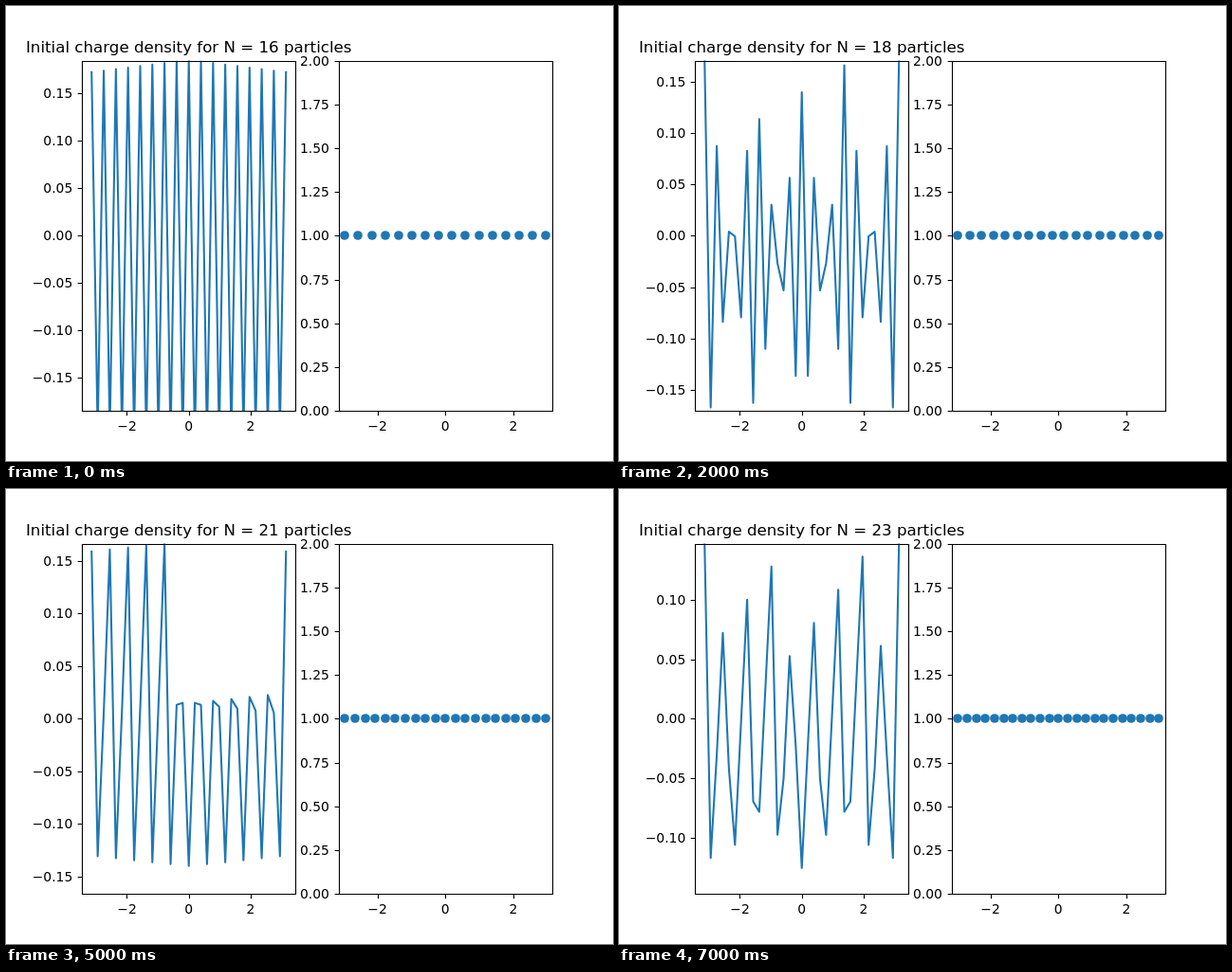
Recreate the animation shown at these times as an HTML page. Size 640x480 px, loop 8000 ms.

```html
<!DOCTYPE html>
<html>
<head>
<meta charset="utf-8">
<style>
  html, body { margin: 0; width: 100%; height: 100%; overflow: hidden; background: #fff; }
  svg { display: block; }
  text { font-family: "DejaVu Sans", sans-serif; font-size: 13.89px; }
  .title { font-size: 16.67px; }
  .axis { fill: none; stroke: #000; stroke-width: 1.11; }
  .curve { fill: none; stroke: #1f77b4; stroke-width: 2.083; stroke-linejoin: round; stroke-linecap: square; }
  circle { fill: #1f77b4; }
</style>
</head>
<body>
<svg id="stage" width="640" height="480" viewBox="0 0 640 480"></svg>
<script>
const TOP = 57.6, BOTTOM = 427.2, MID = 242.4, HALF = 184.8;
const LEFT = { x0: 80, x1: 305.45, mid: 192.73, unit: 32.62 };
const RIGHT = { x0: 350.55, x1: 576, mid: 463.27, unit: 35.88 };
const CELLS = 32, CELL = 2 * Math.PI / CELLS;
const SPAN = Math.PI * 31 / 33;   // outermost particle position

const stage = document.getElementById('stage');
const snap = v => Math.round(v) + 0.5;
const label = (v, digits) => v.toFixed(digits).replace('-', '\u2212');
const text = (x, y, s, anchor, cls = '') =>
  `<text class="${cls}" x="${x}" y="${y}" text-anchor="${anchor}">${s}</text>`;

function particles(n) {
  return Array.from({ length: n }, (_, k) => SPAN * (2 * k - n + 1) / (n - 1));
}

// Linear weighting onto the grid; a later particle replaces what a node held.
function density(n) {
  const weight = new Array(CELLS + 1).fill(0);
  for (const x of particles(n)) {
    const p = CELLS / 2 + x / CELL, i = Math.floor(p);
    weight[i] = 1 - (p - i);
    weight[i + 1] = p - i;
  }
  const total = weight.reduce((a, b) => a + b);
  const background = 0.0095 + 0.1753 * total / n;
  return weight.map(w => background - 6.47 / n * w);
}

function axes(a, yTicks, yPos) {
  const x0 = snap(a.x0), x1 = snap(a.x1), y0 = snap(TOP), y1 = snap(BOTTOM);
  let path = `M${x0} ${y0}H${x1}V${y1}H${x0}Z`, labels = '';
  for (const v of [-2, 0, 2]) {
    const x = a.mid + v * a.unit;
    path += `M${snap(x)} ${y1}v4.86`;
    labels += text(x, 448, label(v, 0), 'middle');
  }
  for (const v of yTicks) {
    const y = yPos(v);
    path += `M${x0} ${snap(y)}h-4.86`;
    labels += text(a.x0 - 9.72, Math.round(y + 5), label(v, 2), 'end');
  }
  return `<path class="axis" d="${path}"/>` + labels;
}

function draw(n) {
  const rho = density(n), limit = Math.max(...rho);
  const rhoY = v => MID - v / limit * HALF;
  const points = rho.map((v, i) =>
    `${LEFT.mid + (i - CELLS / 2) * CELL * LEFT.unit},${rhoY(v)}`).join(' ');
  const rhoTicks = [-3, -2, -1, 0, 1, 2, 3].map(k => k * 0.05).filter(v => Math.abs(v) <= limit);
  const dots = particles(n).map(x =>
    `<circle cx="${Math.round(RIGHT.mid + x * RIGHT.unit)}" cy="242" r="4.86"/>`).join('');
  const quarters = Array.from({ length: 9 }, (_, k) => k / 4);

  stage.innerHTML =
    `<clipPath id="plot"><rect x="80" y="${TOP}" width="225.45" height="${BOTTOM - TOP}"/></clipPath>` +
    `<polyline class="curve" clip-path="url(#plot)" points="${points}"/>` +
    axes(LEFT, rhoTicks, rhoY) +
    text(LEFT.mid, 49, `Initial charge density for N = ${n} particles`, 'middle', 'title') +
    dots + axes(RIGHT, quarters, v => BOTTOM - v * HALF);
}

let shown = 0;
function tick() {
  const n = 16 + Math.floor(performance.now() % 8000 / 1000);
  if (n !== shown) draw(shown = n);
  requestAnimationFrame(tick);
}
tick();
</script>
</body>
</html>
```
